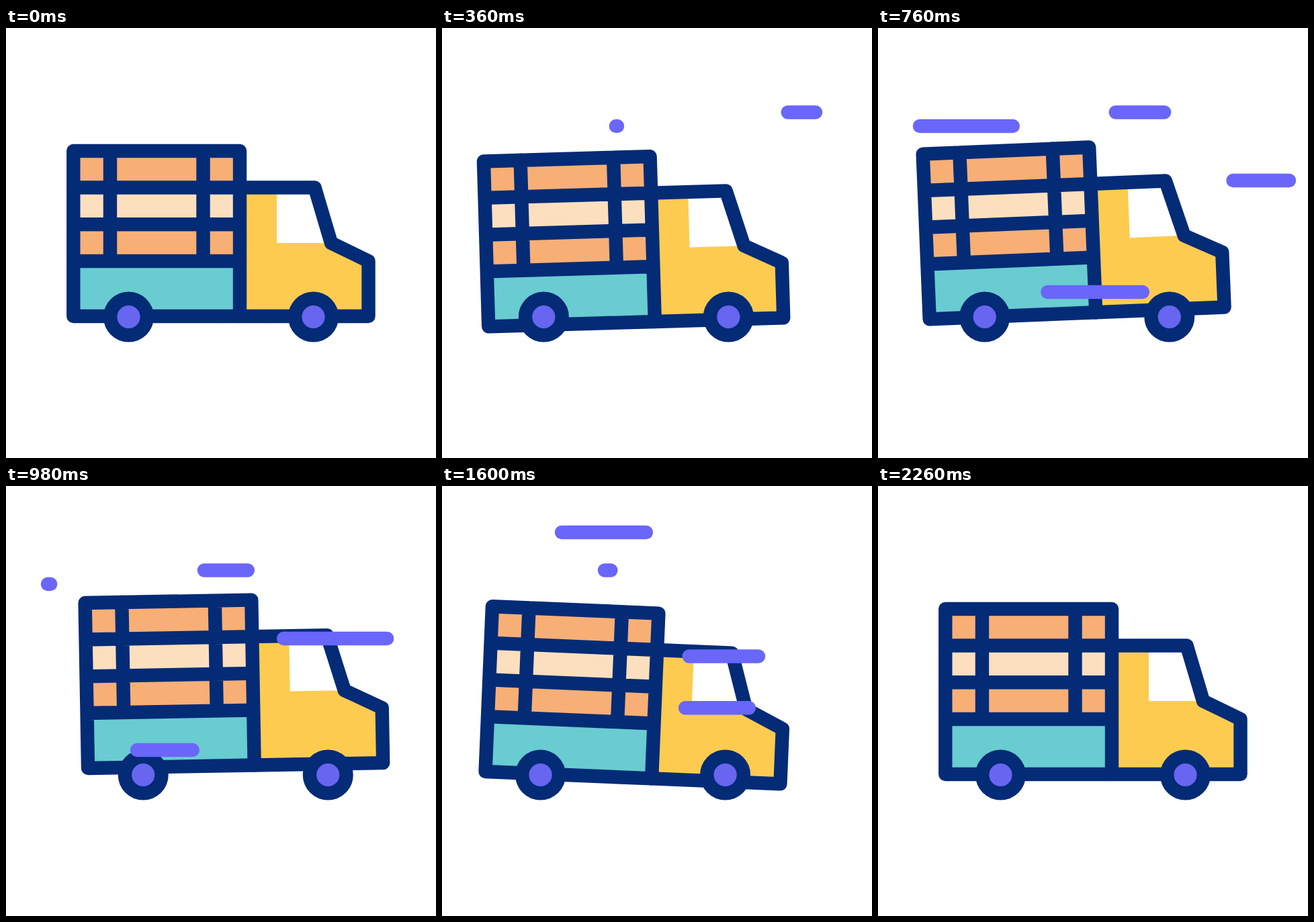
An HTML page that plays this animation: 640 by 640 pixels, repeating every 2.4 s.

```html
<!DOCTYPE html>
<html lang="en">
<head>
<meta charset="utf-8">
<title>Delivery truck</title>
<style>
  @property --lead { syntax: "<length>"; inherits: false; initial-value: 0px; }
  @property --tail { syntax: "<length>"; inherits: false; initial-value: 0px; }

  html, body { margin: 0; width: 100%; height: 100%; overflow: hidden; background: #fff; }
  svg { display: block; width: 100%; height: 100%; }

  :root {
    --loop: 2400ms;
    --sine: cubic-bezier(.364, 0, .636, 1);
    --quad-out: cubic-bezier(.5, 1, .89, 1);
  }

  .truck { animation: drive var(--loop) var(--sine) infinite; }
  .body {
    transform-origin: 320px 430px;
    animation: bounce var(--loop) var(--sine) infinite, tilt var(--loop) var(--sine) infinite;
  }
  .frame { fill: none; stroke: #042b76; stroke-width: 20.4; stroke-linecap: round; stroke-linejoin: round; }
  .wheel { fill: #6865f1; stroke: #042b76; stroke-width: 20.4; }

  @keyframes drive {
    0%, .83%     { translate: 0 0; }
    23.75%       { translate: -45.5px 0; }
    46.04%       { translate: 31.5px 0; }
    68.1%        { translate: -36.6px 0; }
    90.8%, 100%  { translate: 0 0; }
  }
  @keyframes bounce {
    0%, .83%     { translate: 0 0; }
    17.9%        { translate: 0 9.5px; }
    41.7%        { translate: 0 -13px; }
    60.4%        { translate: 0 10.5px; }
    78.3%        { translate: 0 -8.7px; }
    94.2%, 100%  { translate: 0 0; }
  }
  @keyframes tilt {
    0%, .83%     { rotate: 0deg; }
    25%          { rotate: -2.65deg; }
    66.4%        { rotate: 2.4deg; }
    91.7%, 100%  { rotate: 0deg; }
  }

  /* Each streak grows from its right end, then its tail catches up. */
  .streak {
    --lag: 275ms;
    --len: 199px;
    --early: calc(var(--start) - var(--loop));
    fill: none;
    stroke: #6a66f9;
    stroke-width: 20.4;
    stroke-linecap: round;
    stroke-dasharray: calc(var(--lead) - var(--tail)) 999px;
    stroke-dashoffset: calc(-1 * var(--tail));
    animation: lead var(--loop) var(--sine) infinite,
               tail var(--loop) var(--sine) infinite,
               show var(--loop) step-end infinite;
    animation-delay: var(--early), calc(var(--early) + var(--lag)), var(--early);
  }
  .slow {
    --lag: 145ms;
    --len: 314px;
    animation-name: slow-lead, slow-tail, slow-show;
    animation-timing-function: var(--quad-out), var(--quad-out), step-end;
  }

  @keyframes lead {
    0% { --lead: 0px; }
    17.08%, 100% { --lead: var(--len); }
  }
  @keyframes tail {
    0% { --tail: 0px; }
    17.08%, 70% { --tail: var(--len); }
    70.01%, 100% { --tail: 0px; }
  }
  @keyframes show {
    0% { opacity: 1; }
    28.3%, 100% { opacity: 0; }
  }
  @keyframes slow-lead {
    0% { --lead: 0px; }
    49.5%, 100% { --lead: var(--len); }
  }
  @keyframes slow-tail {
    0% { --tail: 0px; }
    59.6%, 70% { --tail: var(--len); }
    70.01%, 100% { --tail: 0px; }
  }
  @keyframes slow-show {
    0% { opacity: 1; }
    65%, 100% { opacity: 0; }
  }
</style>
</head>
<body>
<svg viewBox="0 0 640 640">
  <g class="truck">
    <g class="body">
      <path fill="#fdcb50" d="M348 237.5H459.5L484 320L539.5 347V429H348Z"/>
      <path fill="#fff" d="M403 237.5H459.5L484 320H403Z"/>
      <path fill="#f7af76" d="M100 183H348V347H100Z"/>
      <path fill="#fcdfbe" d="M100 237.5H348V292H100Z"/>
      <path fill="#68ccd0" d="M100 347H348V429H100Z"/>
      <path class="frame" d="M100.3 183H348V429H100.3ZM100.3 237.5H348M100.3 292.3H348M100.3 347H348M155 183V347M293.5 183V347"/>
      <path class="frame" d="M348 237.5H459.5L484 320L539.5 347V429H348"/>
    </g>
    <circle class="wheel" cx="182.5" cy="430" r="27.3"/>
    <circle class="wheel" cx="457.5" cy="430" r="27.3"/>
  </g>
  <path class="streak" style="--start:334ms" d="M261 146h-199"/>
  <path class="streak slow" style="--start:280ms" d="M556 125.5h-314"/>
  <path class="streak" style="--start:577ms" d="M612 227h-199"/>
  <path class="streak" style="--start:499ms;--lag:255ms" d="M394 393h-199"/>
  <path class="streak" style="--start:1115ms" d="M561 330.3h-199"/>
  <path class="streak" style="--start:1156ms" d="M377 69h-199"/>
  <path class="streak" style="--start:1391ms" d="M471 253.5h-199"/>
</svg>
</body>
</html>
```
